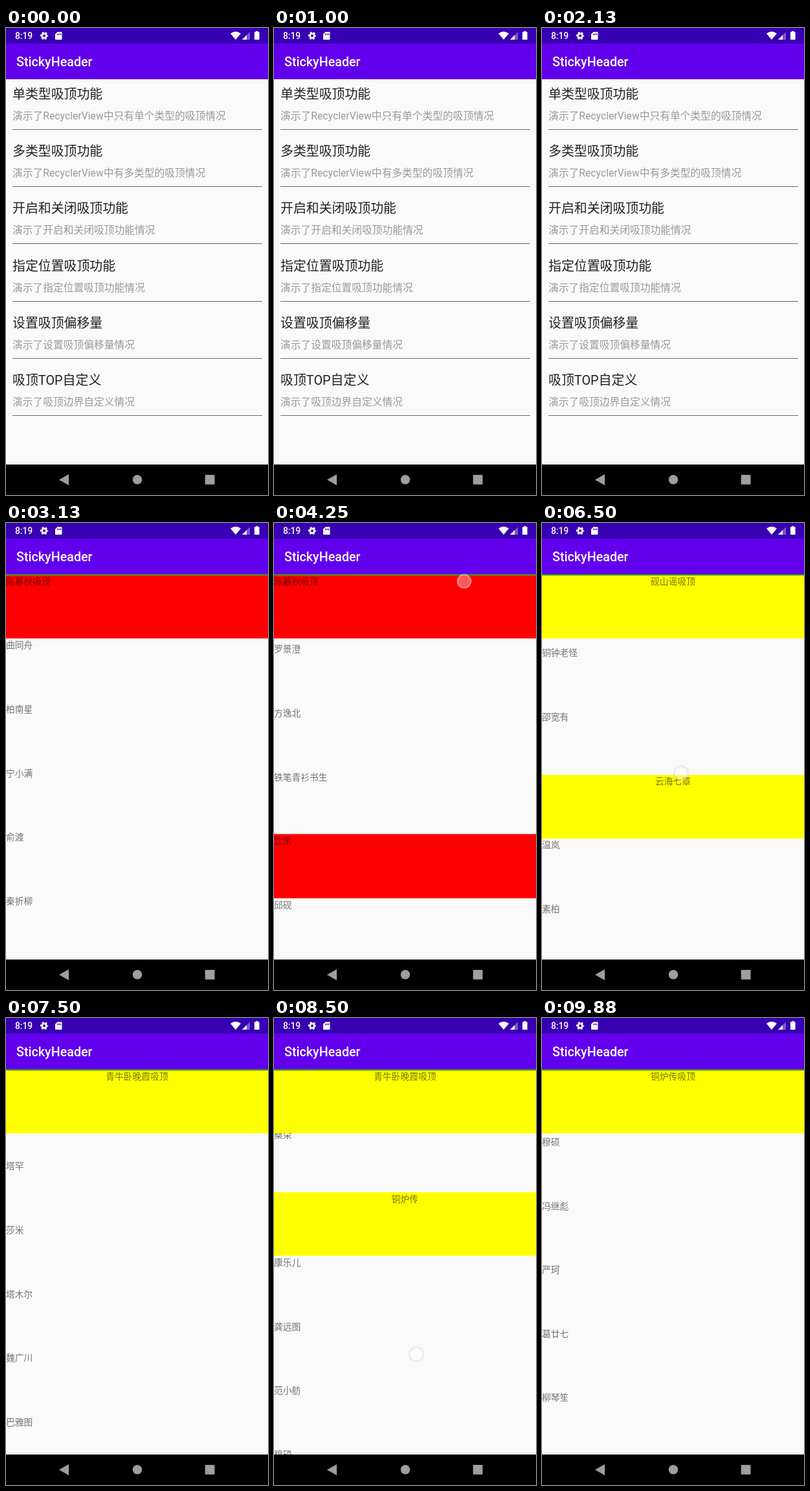
These frames come from a looping animation (405 by 720 pixels, 9.97 s). An HTML page:

```html
<!DOCTYPE html>
<html lang="zh-CN">
<head>
<meta charset="utf-8">
<title>StickyHeader</title>
<style>
  html, body { margin: 0; width: 100%; height: 100%; overflow: hidden; background: #fafafa; }
  body { position: relative; font-family: Roboto, "Noto Sans CJK SC", "Noto Sans CJK", sans-serif; }
  .status, .toolbar, .nav, .view, .menu div, .list, .row, .edge, .touch { position: absolute; left: 0; }
  .status { top: 0; width: 405px; height: 24px; background: #3700b3; }
  .toolbar {
    top: 24px; width: 389px; height: 55px; padding-left: 16px;
    background: #6200ee; color: #fff; font: 500 19.7px/57px Roboto, sans-serif;
  }
  .nav { top: 673px; width: 405px; height: 47px; background: #000; }
  svg { position: absolute; left: 0; top: 0; }
  .view { top: 79px; width: 405px; height: 594px; overflow: hidden; background: #fafafa; }
  .menu div { left: 10px; width: 386px; height: 77px; border-bottom: 1px solid #6a6a6a; white-space: nowrap; }
  .menu b { display: block; padding-top: 12px; font-weight: 400; font-size: 19.9px; line-height: 24px; color: #212121; }
  .menu span { display: block; padding-top: 11px; font-size: 15.75px; line-height: 20px; color: #999; }
  .list, .sticky { top: .75px; }
  .row {
    width: 405px; height: 98.6px; font-size: 13.78px; line-height: 20px;
    color: rgba(0, 0, 0, .54); white-space: nowrap;
  }
  .red { background: #f00; }
  .yellow { background: #ff0; text-align: center; }
  .edge { top: 0; width: 405px; height: 2px; background: #3c9d1c; }
  .touch {
    top: 0; width: 20px; height: 20px; margin: -11px; border-radius: 50%;
    border: 1px solid rgba(205, 200, 230, .55);
    background: radial-gradient(rgba(255, 255, 255, .34) 40%, rgba(255, 255, 255, .5));
    box-shadow: 0 0 3px rgba(190, 185, 225, .4);
  }
</style>
</head>
<body>
<div class="view menu" id="menu"></div>
<div class="view" id="page">
  <div class="list" id="list"></div>
  <div class="row sticky" id="sticky"></div>
  <div class="edge"></div>
</div>
<div class="status"></div>
<div class="toolbar">StickyHeader</div>
<div class="nav"></div>
<svg width="405" height="720" fill="#fff">
  <text x="14" y="17" font-family="Roboto, sans-serif" font-size="13.8" font-weight="500">8:19</text>
  <circle cx="59" cy="12" r="3.4" fill="none" stroke="#fff" stroke-width="2.8"/>
  <circle cx="59" cy="12" r="5.3" fill="none" stroke="#fff" stroke-width="1.8" stroke-dasharray="2.8 2.75" stroke-dashoffset="1.4"/>
  <path fill-rule="evenodd" d="M79.5 6H85.5Q86.5 6 86.5 7V17Q86.5 18 85.5 18H77Q76 18 76 17V9.5ZM79 8.5V11H80.3V8.5ZM81.4 8.5V11H82.7V8.5ZM83.8 8.5V11H85.1V8.5Z"/>
  <path d="M355 18L347 8.6Q355 2.6 363 8.6Z"/>
  <path d="M365 18L377 6V18Z" opacity=".35"/>
  <path d="M365 18L372 11V18Z"/>
  <path d="M386 6V4.8H389.6V6H391Q391.6 6 391.6 6.6V17.4Q391.6 18 391 18H384.6Q384 18 384 17.4V6.6Q384 6 384.6 6Z"/>
  <g fill="#9e9e9e">
    <path d="M82 696.4L97 688V705Z"/>
    <circle cx="203" cy="696.3" r="7.2"/>
    <rect x="307.7" y="689" width="14.8" height="14.8" rx="1"/>
  </g>
</svg>
<div class="touch" id="touch"></div>
<script>
const LOOP = 9970, ROW = 98.6, TAP = 2560, OPEN = 2780;
const $ = id => document.getElementById(id);
const menu = $('menu'), page = $('page'), list = $('list'), sticky = $('sticky'), touch = $('touch');

const demos = [
  ['单类型吸顶功能', '演示了RecyclerView中只有单个类型的吸顶情况'],
  ['多类型吸顶功能', '演示了RecyclerView中有多类型的吸顶情况'],
  ['开启和关闭吸顶功能', '演示了开启和关闭吸顶功能情况'],
  ['指定位置吸顶功能', '演示了指定位置吸顶功能情况'],
  ['设置吸顶偏移量', '演示了设置吸顶偏移量情况'],
  ['吸顶TOP自定义', '演示了吸顶边界自定义情况']
];
menu.innerHTML = demos.map(([name, note], i) =>
  `<div style="top:${(i * 88.2).toFixed(2)}px"><b>${name}</b><span>${note}</span></div>`).join('');

const sections = [
  ['red', '陈暮秋', '曲同舟 柏南星 宁小满 俞渡 秦折柳 罗景澄 方逸北 铁笔青衫书生'],
  ['red', '沈禾', '邱砚 简江白 焦一盏 蒲牧 路寒声'],
  ['yellow', '霜谷鸣鹤', '丁鹿溪 石三弓 钟亦松 贺柏年 贺万春 卢和 曾桐'],
  ['yellow', '砚山谣', '水青禾 汪澈 铜钟老怪 邵宽有'],
  ['yellow', '云海七章', '温岚 素柏 叶照溪 雷鸿远 游半夏'],
  ['yellow', '青牛卧晚霞', '计同 塔罕 莎米 塔木尔 魏广川 巴雅图 霍苗 桑朵'],
  ['yellow', '铜炉传', '康乐儿 龚远图 范小舫 穆硕 冯继彪 严珂 葛廿七 柳琴笙']
];
const heads = [];
let count = 0;

function addRow(text, kind = '') {
  const row = document.createElement('div');
  row.className = 'row ' + kind;
  row.style.top = count++ * ROW + 'px';
  row.textContent = text;
  list.append(row);
}
for (const [kind, name, people] of sections) {
  heads.push({ kind, name, y: count * ROW });
  addRow(name, kind);
  people.split(' ').forEach(p => addRow(p));
}
const END = count * ROW - 594;

// Drags: start, release, x, y from, y to, fling end time, resting scroll
const drags = [
  [3350, 3600, 290, 480, 330, 3950, 200],
  [4030, 4260, 294, 377.15, 78, 4930, 920],
  [4950, 5150, 250, 450, 190, 5600, 1538.95],
  [5720, 5920, 235, 560, 220, 6350, 2300],
  [6380, 6600, 215, 538.35, 261, 6980, 2900],
  [7000, 7180, 220, 470, 210, 7460, 3411.35],
  [7800, 8000, 220, 520, 230, 8450, 4050],
  [8500, 8720, 220, 520, 200, 9050, END]
];

function motion(t) {
  let scroll = 0, finger = t >= TAP && t < TAP + 120 ? [200, 205] : null;
  for (const [start, release, x, y0, y1, stop, rest] of drags) {
    if (t < start) break;
    if (t < release) {
      const y = y0 + (y1 - y0) * (t - start) / (release - start);
      return { scroll: scroll + y0 - y, finger: [x, y] };
    }
    const thrown = scroll + y0 - y1;
    const left = 1 - Math.min(1, (t - release) / (stop - release));
    scroll = rest - (rest - thrown) * left * left;
  }
  return { scroll, finger };
}

function draw(t) {
  const { scroll, finger } = motion(t);
  const shown = Math.max(0, Math.min(1, (t - OPEN) / 160));
  page.style.opacity = shown;
  page.style.transform = shown < 1 ? `translateY(${40 * (1 - shown) ** 2}px)` : 'none';
  list.style.transform = `translateY(${-scroll}px)`;

  const next = heads.findIndex(h => h.y > scroll);
  const head = heads[next < 0 ? heads.length - 1 : next - 1];
  const push = next < 0 ? 0 : Math.min(0, heads[next].y - scroll - ROW);
  const label = head.name + '吸顶';
  if (sticky.textContent !== label) {
    sticky.textContent = label;
    sticky.className = 'row sticky ' + head.kind;
  }
  sticky.style.transform = `translateY(${push}px)`;

  touch.style.visibility = finger ? 'visible' : 'hidden';
  if (finger) touch.style.transform = `translate(${finger[0]}px, ${finger[1]}px)`;
}

const origin = performance.now();
function tick() {
  draw((performance.now() - origin) % LOOP);
  requestAnimationFrame(tick);
}
tick();
</script>
</body>
</html>
```
